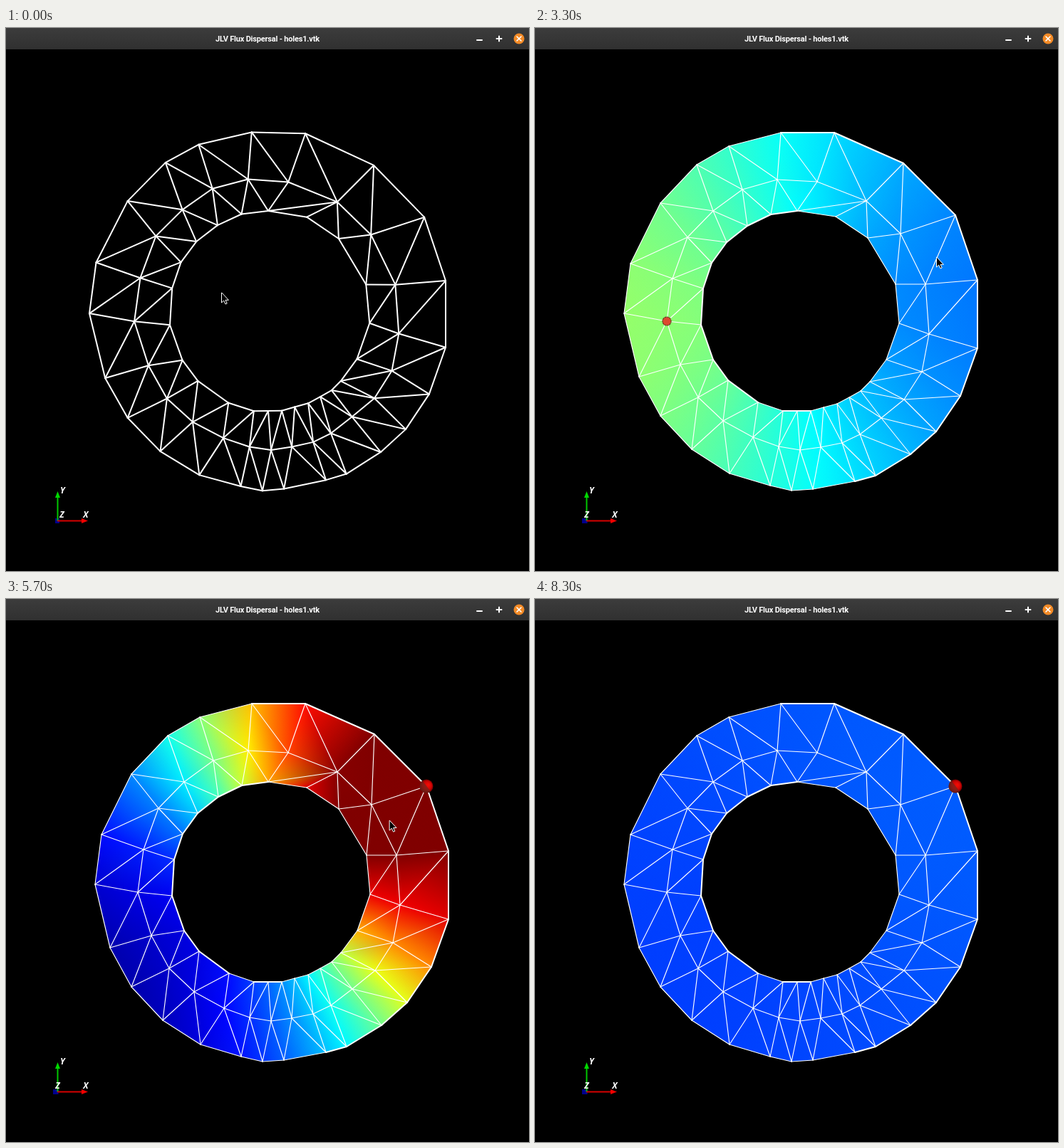
Recreate the animation shown at these times as an HTML page with a canvas. Size 734x763 px, loop 8.9 s.

```html
<!DOCTYPE html>
<html lang="en">
<head>
<meta charset="utf-8">
<title>Heat on a ring mesh</title>
<style>
  html, body { margin: 0; width: 100%; height: 100%; overflow: hidden; background: #000; }
  canvas { display: block; }
</style>
</head>
<body>
<canvas id="stage" width="734" height="763"></canvas>
<script>
const ctx = document.getElementById('stage').getContext('2d');
const LOOP = 8900, CX = 369, CY = 398;
const clamp = (v, lo = 0, hi = 1) => Math.min(hi, Math.max(lo, v));
const pairs = list => list.flatMap((x, i) => i % 2 ? [] : [[x, list[i + 1]]]);

// Three rings of equal count, clockwise from the top
const outer = pairs([345,147, 420,147, 517,190, 590,263, 621,354, 621,450, 597,517, 563,567,
  527,599, 478,629, 449,637, 390,648, 360,650, 330,643, 273,626, 220,592, 176,545, 146,490,
  125,401, 134,331, 176,246, 227,192, 272,166]);
const middle = pairs([340,213, 396,216, 465,243, 513,289, 548,360, 553,430, 543,483, 518,522,
  486,548, 456,571, 431,583, 401,589, 372,593, 342,588, 306,575, 264,552, 229,519, 204,473,
  185,412, 193,352, 214,294, 250,257, 291,227]);
const inner = pairs([368,257, 422,265, 467,295, 506,360, 511,415, 493,466, 470,497, 457,510,
  441,519, 424,528, 405,533, 387,538, 368,538, 348,538, 313,526, 271,495, 250,466, 233,417,
  236,366, 248,330, 269,301, 298,278, 331,262]);
const N = outer.length, points = [...outer, ...middle, ...inner];
const O = i => i % N, M = i => N + i % N, I = i => 2 * N + i % N;

const triangles = [];
for (let i = 0; i < N; i++) {
  triangles.push([O(i), M(i), M(i + 1)], [O(i), O(i + 1), M(i + 1)],
    [I(i === 1 ? 0 : i), M(i), M(i + 1)],
    [I(i), I(i + 1), M(i === 0 ? 2 : i + 1)]);
}
const edges = new Map();
for (const [a, b, c] of triangles)
  for (const e of [[a, b], [b, c], [c, a]]) edges.set(e.sort((p, q) => p - q).join(), e);

const sources = [M(18), O(3)];
const cursorPath = [[0,302,372], [600,321,380], [1300,187,414], [1600,187,414], [2100,321,406],
  [2400,372,398], [2800,372,398], [3300,563,322], [3700,576,292], [4700,588,262],
  [5500,588,262], [6000,462,385], [7400,462,385], [8000,39,-20], [8900,39,-20]];

function jet(v) {
  return [3, 2, 1].map(c => Math.round(255 * clamp(1.5 - Math.abs(4 * clamp(v) - c))));
}

// Spreading and cooling heat kernel around the ring, s steps after ignition
function heat([x, y], [sx, sy], s) {
  if (s <= 0) return 0;
  const r = Math.hypot(x - CX, y - CY);
  const angle = Math.atan2(y - CY, x - CX) - Math.atan2(sy - CY, sx - CX);
  const q = Math.exp(-0.107 * s), mean = 0.575 - 0.0121 * s;
  let sum = 0;
  for (let n = 1; n < 8; n++) sum += q ** (n * n) * Math.cos(n * angle);
  const wide = mean * (1 + 2 * sum * (0.75 + 0.27 * r / 250));
  const d = Math.hypot(x - sx, y - sy);
  const near = d < 115 ? 1 : 0.35 * Math.exp(-(((d - 127) / 40) ** 2));
  const mix = clamp((s - 1) / 3);
  return clamp(near * (1 - mix) + clamp(wide) * mix);
}

function steps(t) {
  return t < 5100
    ? (Math.min(t, 4700) - 1400 - clamp(t - 2400, 0, 300)) / 100
    : (Math.min(t, 8300) - 5000 - clamp(t - 5400, 0, 100) - clamp(t - 6300, 0, 100)) / 100;
}

// Perspective turn about the vertical axis; 0 faces the viewer
function turn([x, y], u) {
  const d = x - CX, dx = d / (1 - 0.0082 * u + 0.0000964 * u * d);
  return [CX + dx, CY + (y - CY) * (1 - 0.0000964 * u * dx)];
}

function trace(pts) {
  ctx.beginPath();
  pts.forEach(p => ctx.lineTo(...p));
}

function polygon(pts, color) {
  trace(pts);
  ctx.closePath();
  ctx.fillStyle = color;
  ctx.fill();
}

function line(pts, color, width) {
  trace(pts);
  ctx.strokeStyle = color;
  ctx.lineWidth = width;
  ctx.stroke();
}

function disc(x, y, r, color) {
  ctx.beginPath();
  ctx.arc(x, y, r, 0, 7);
  ctx.fillStyle = color;
  ctx.fill();
}

function label(text, x, y, font) {
  ctx.font = font;
  ctx.fillStyle = '#fff';
  ctx.textAlign = 'center';
  ctx.textBaseline = 'middle';
  ctx.fillText(text, x, y);
}

// Blend three corner colours by adding one fading ramp per corner
function shade(pts, colors) {
  for (let k = 0; k < 3; k++) {
    const [a, b, c] = [0, 1, 2].map(j => pts[(k + j) % 3]);
    const ex = c[0] - b[0], ey = c[1] - b[1];
    const f = ((a[0] - b[0]) * ex + (a[1] - b[1]) * ey) / (ex * ex + ey * ey);
    const ramp = ctx.createLinearGradient(...a, b[0] + f * ex, b[1] + f * ey);
    ramp.addColorStop(0, `rgb(${colors[k]})`);
    ramp.addColorStop(1, '#000');
    polygon(pts, ramp);
  }
}

function drawMesh(t) {
  const u = 1 - clamp(t / 600), filled = t >= 900;
  const pos = points.map(p => turn(p, u));
  if (filled) {
    const source = points[sources[t < 5100 ? 0 : 1]], s = steps(t);
    const colors = points.map(p => jet(heat(p, source, s)));
    ctx.globalCompositeOperation = 'lighter';
    for (const tri of triangles) shade(tri.map(i => pos[i]), tri.map(i => colors[i]));
    ctx.globalCompositeOperation = 'source-over';
  }
  for (const [a, b] of edges.values()) {
    const thick = b < 11 || (a >= I(11) && a < I(13)) || a >= I(14) || (a === I(0) && b === I(22));
    line([pos[a], pos[b]], '#fff', !filled || thick ? 2 : 1.15);
  }
}

function drawSource(t) {
  if (t < 1400) return;
  if (t < 5000) {
    const [x, y] = points[sources[0]];
    if (t < 2500) {
      for (let k = 0; k < 4; k++) {
        const dx = 5 * Math.cos(k * Math.PI / 4), dy = 5 * Math.sin(k * Math.PI / 4);
        line([[x - dx, y - dy], [x + dx, y + dy]], '#e84040', 1);
      }
      return;
    }
    disc(x, y, 6, '#dc4a30');
    ctx.setLineDash([2, 1.5]);
    ctx.strokeStyle = '#6b3a20';
    ctx.lineWidth = 1.2;
    ctx.stroke();
    ctx.setLineDash([]);
    return;
  }
  const [x, y] = points[sources[1]], r = t < 5200 ? 8.5 : 9.5;
  const ball = ctx.createRadialGradient(x + 3, y - 2, 1, x, y, r);
  ball.addColorStop(0, '#f00c06');
  ball.addColorStop(0.6, '#cc0404');
  ball.addColorStop(1, '#760000');
  disc(x, y, r, ball);
  if (t < 5200) return;
  ctx.beginPath();
  ctx.arc(x, y, r, 0.9, 4.1);
  ctx.fillStyle = 'rgba(90,45,35,.6)';
  ctx.fill();
}

function drawAxes(t) {
  const shift = 3 * clamp(t / 600);
  ctx.fillStyle = '#00008c';
  ctx.fillRect(69 - shift, 689, 6 + shift / 2, 7);
  line([[72.5, 692], [72.5, 659]], '#00c800', 2);
  polygon([[72.5, 651], [69, 660], [76, 660]], '#00d800');
  line([[73, 692.5], [107, 692.5]], '#d80000', 2);
  polygon([[115, 692.5], [106, 689], [106, 696]], '#f00000');
  const font = 'italic bold 12px "Open Sans", "Noto Sans", sans-serif';
  label('X', 112, 685, font);
  label('Y', 79.5, 651, font);
  label('Z', 78.5 - 2 * shift, 685, font);
}

function drawBar() {
  const bar = ctx.createLinearGradient(0, 0, 0, 30);
  bar.addColorStop(0, '#3c3c3c');
  bar.addColorStop(1, '#303030');
  ctx.fillStyle = bar;
  ctx.fillRect(0, 0, 734, 30);
  ctx.letterSpacing = '-0.2px';
  label('JLV Flux Dispersal - holes1.vtk', 367, 15.5, 'bold 11px Roboto, "Open Sans", sans-serif');
  ctx.letterSpacing = '0px';
  line([[661, 17], [668, 17]], '#fff', 2);
  line([[688.5, 15], [695.5, 15]], '#fff', 2);
  line([[692, 11.5], [692, 18.5]], '#fff', 2);
  disc(720, 15, 7.5, '#f28a26');
  line([[717, 12], [723, 18]], '#fff', 1.6);
  line([[723, 12], [717, 18]], '#fff', 1.6);
}

function drawCursor(t) {
  const i = cursorPath.findIndex(k => k[0] > t);
  const [t0, x0, y0] = cursorPath[i - 1], [t1, x1, y1] = cursorPath[i];
  const f = (t - t0) / (t1 - t0);
  ctx.save();
  ctx.translate(x0 + (x1 - x0) * f, y0 + (y1 - y0) * f);
  polygon([[0.5, 0], [0.5, 14], [3.7, 11], [6, 16], [8.2, 15], [6, 10.3], [10, 10.3]], '#000');
  ctx.strokeStyle = '#fff';
  ctx.lineWidth = 1;
  ctx.stroke();
  ctx.restore();
}

const start = performance.now();
function draw() {
  const t = Math.floor((performance.now() - start) % LOOP / 100) * 100;
  ctx.fillStyle = '#000';
  ctx.fillRect(0, 0, 734, 763);
  ctx.lineJoin = ctx.lineCap = 'round';
  drawMesh(t);
  drawSource(t);
  drawAxes(t);
  drawBar();
  drawCursor(t);
  requestAnimationFrame(draw);
}
draw();
</script>
</body>
</html>
```
